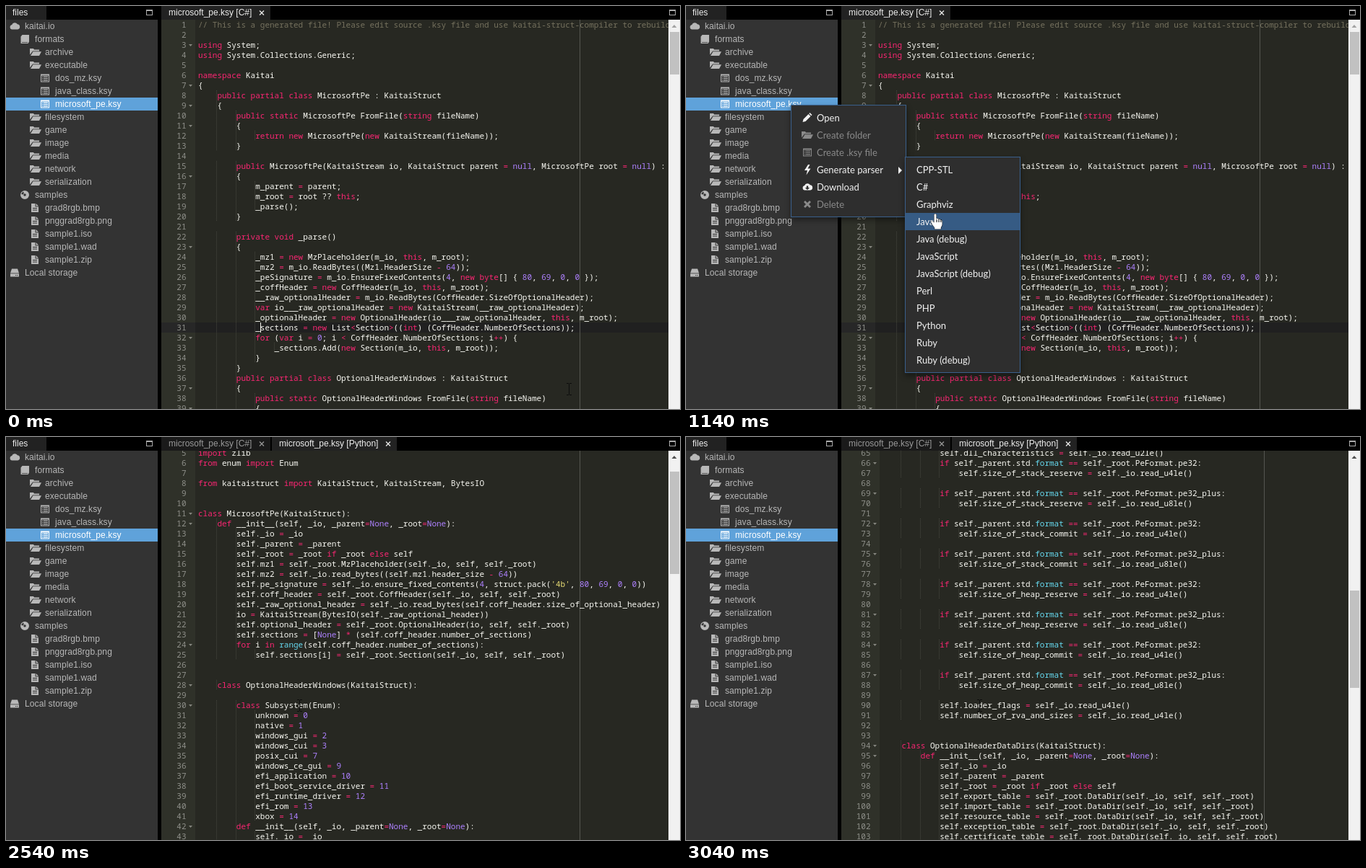
An HTML page with a canvas that plays this animation: 933x559 px, repeating every 4.16 s.

```html
<!DOCTYPE html>
<html lang="en">
<head>
<meta charset="utf-8">
<title>Parser generator</title>
<style>
html, body { margin: 0; width: 100%; height: 100%; overflow: hidden; background: #000; }
canvas { display: block; }
</style>
</head>
<body>
<canvas id="stage" width="933" height="559"></canvas>
<script>
const ctx = document.getElementById('stage').getContext('2d');
const LOOP = 4160, ROW = 14, CHAR = 6.6;
const MONO = '500 11px "Noto Sans Mono", "DejaVu Sans Mono", monospace';
const SANS = '12px "Liberation Sans", Arial, sans-serif';
const MENU_FONT = '13px Lato, sans-serif';

// ---- code shown in the two editors ----
const csharp = `// This is a generated file! Please edit source .ksy file and use kaitai-struct-compiler to rebuild

using System;
using System.Collections.Generic;

namespace Kaitai
{
    public partial class MicrosoftPe : KaitaiStruct
    {
        public static MicrosoftPe FromFile(string fileName)
        {
            return new MicrosoftPe(new KaitaiStream(fileName));
        }

        public MicrosoftPe(KaitaiStream io, KaitaiStruct parent = null, MicrosoftPe root = null) : base(io)
        {
            m_parent = parent;
            m_root = root ?? this;
            _parse();
        }

        private void _parse()
        {
            _mz1 = new MzPlaceholder(m_io, this, m_root);
            _mz2 = m_io.ReadBytes((Mz1.HeaderSize - 64));
            _peSignature = m_io.EnsureFixedContents(4, new byte[] { 80, 69, 0, 0 });
            _coffHeader = new CoffHeader(m_io, this, m_root);
            __raw_optionalHeader = m_io.ReadBytes(CoffHeader.SizeOfOptionalHeader);
            var io___raw_optionalHeader = new KaitaiStream(__raw_optionalHeader);
            _optionalHeader = new OptionalHeader(io___raw_optionalHeader, this, m_root);
            _sections = new List<Section>((int) (CoffHeader.NumberOfSections));
            for (var i = 0; i < CoffHeader.NumberOfSections; i++) {
                _sections.Add(new Section(m_io, this, m_root));
            }
        }
        public partial class OptionalHeaderWindows : KaitaiStruct
        {
            public static OptionalHeaderWindows FromFile(string fileName)
            {`;

const pad = ' '.repeat(12);
const read = (bytes, names) =>
  names.split(' ').map(n => `${pad}self.${n} = self._io.read_u${bytes}le()`).join('\n');
const bySize = name => [['pe32', 4], ['pe32_plus', 8]].map(([fmt, bytes]) =>
  `${pad}if self._parent.std.format == self._root.PeFormat.${fmt}:\n    ${read(bytes, name)}\n`).join('\n');
const dirs = names =>
  names.split(' ').map(n => `${pad}self.${n}_table = self._root.DataDir(self._io, self, self._root)`).join('\n');
const init = `def __init__(self, _io, _parent=None, _root=None):`;
const initBody = indent =>
  ['_io = _io', '_parent = _parent', '_root = _root if _root else self']
    .map(s => `${indent}self.${s}`).join('\n');

const python = `# This is a generated file! Please edit source .ksy file and use kaitai-struct-compiler to rebuild

import array
import struct
import zlib
from enum import Enum

from kaitaistruct import KaitaiStruct, KaitaiStream, BytesIO


class MicrosoftPe(KaitaiStruct):
    ${init}
${initBody('        ')}
        self.mz1 = self._root.MzPlaceholder(self._io, self, self._root)
        self.mz2 = self._io.read_bytes((self.mz1.header_size - 64))
        self.pe_signature = self._io.ensure_fixed_contents(4, struct.pack('4b', 80, 69, 0, 0))
        self.coff_header = self._root.CoffHeader(self._io, self, self._root)
        self._raw_optional_header = self._io.read_bytes(self.coff_header.size_of_optional_header)
        io = KaitaiStream(BytesIO(self._raw_optional_header))
        self.optional_header = self._root.OptionalHeader(io, self, self._root)
        self.sections = [None] * (self.coff_header.number_of_sections)
        for i in range(self.coff_header.number_of_sections):
            self.sections[i] = self._root.Section(self._io, self, self._root)


    class OptionalHeaderWindows(KaitaiStruct):

        class Subsystem(Enum):
            unknown = 0
            native = 1
            windows_gui = 2
            windows_cui = 3
            posix_cui = 7
            windows_ce_gui = 9
            efi_application = 10
            efi_boot_service_driver = 11
            efi_runtime_driver = 12
            efi_rom = 13
            xbox = 14
        ${init}
${initBody(pad)}
${bySize('image_base')}
${read(4, 'section_alignment file_alignment')}
${read(2, 'major_operating_system_version minor_operating_system_version major_image_version minor_image_version major_subsystem_version minor_subsystem_version')}
${read(4, 'win32_version_value size_of_image size_of_headers check_sum')}
${pad}self.subsystem = self._root.Subsystem(self._io.read_u2le())
${read(2, 'dll_characteristics')}
${['stack_reserve', 'stack_commit', 'heap_reserve', 'heap_commit'].map(n => bySize('size_of_' + n)).join('\n')}
${read(4, 'loader_flags number_of_rva_and_sizes')}


    class OptionalHeaderDataDirs(KaitaiStruct):
        ${init}
${initBody(pad)}
${dirs('export import resource exception certificate base_relocation')}`;

// ---- syntax colouring ----
const words = s => new Set(s.split(' '));
const KEYWORDS = words('using namespace public partial class static string return new private void var for int this byte import from def if else in');
const CONSTANTS = words('null None');
const BUILTINS = words('range format');

function colourOf(s) {
  if (/^(\/\/|#)/.test(s)) return '#75715e';
  if (s[0] === "'") return '#e6db74';
  if (/^\d+$/.test(s) || CONSTANTS.has(s)) return '#ae81ff';
  if (KEYWORDS.has(s) || /^[-+*=<>]/.test(s)) return '#f92672';
  return BUILTINS.has(s) ? '#66d9ef' : '#f8f8f2';
}

const parse = (source, foldable) => source.split('\n').map(line => ({
  indent: line.search(/\S/),
  fold: foldable(line),
  tokens: [...line.matchAll(/\/\/.*|#.*|'[^']*'|\w+|[-+*=<>]+|[^\s\w]/g)]
    .map(m => ({ text: m[0], col: m.index, colour: colourOf(m[0]) }))
}));

const editors = {
  csharp: { lines: parse(csharp, l => /\{$/.test(l) || l === 'using System;'), caret: [31, 13], thumb: 59 },
  python: { lines: parse(python, l => /:$/.test(l)), caret: [1, 0], thumb: 142 }
};

// ---- drawing helpers ----
function box(x, y, w, h, colour) {
  ctx.fillStyle = colour;
  ctx.fillRect(x, y, w, h);
}

function label(s, x, y, font, colour) {
  ctx.font = font;
  ctx.fillStyle = colour;
  ctx.fillText(s, x, y);
}

function shape(path, x, y, fill, stroke) {
  ctx.save();
  ctx.translate(x, y);
  if (stroke) { ctx.strokeStyle = stroke; ctx.lineWidth = 1; ctx.stroke(path); }
  if (fill) { ctx.fillStyle = fill; ctx.fill(path, 'evenodd'); }
  ctx.restore();
}

const CLOUD = 'M-3.5 4.5a3.3 3.3 0 0 1-.3-6.5a4.2 4.2 0 0 1 7.6-.8a3.7 3.7 0 0 1 .4 7.3z';
const icons = {
  cloud: CLOUD,
  book: 'M-3.5-6h9.5v9.5l-1.5 2.5h-10v-9.5zM-4 4.2v.9h8v-.9z',
  folder: 'M-8-5h5l1 1.5h7v2h-9l-4 5zM-3.5-.8h11.5l-3 5.8h-12z',
  ksy: 'M-6-5.5h12v11h-12zM-5-3.5v8h10v-8zM-4-2.5h1.3v1.2h-1.3zM-2-2.5h6v1.2h-6zM-4-.1h1.3v1.2h-1.3zM-2-.1h6v1.2h-6zM-4 2.3h1.3v1.2h-1.3zM-2 2.3h6v1.2h-6z',
  disc: 'M-6 0a6 6 0 0 1 12 0a6 6 0 0 1-12 0zM-1.7 0a1.7 1.7 0 0 0 3.4 0a1.7 1.7 0 0 0-3.4 0zM-4.8-1l2.4.5a2 2 0 0 1 1.3-1.7l-1-2.2a5 5 0 0 0-2.7 3.4z',
  file: 'M-5-6h5.5v4.5h4.5v7.5h-10zM1.5-6l3.5 3.5h-3.5zM-3 0v1h6v-1zM-3 2.5v1h6v-1z',
  disk: 'M-4-5.5h8l2 6h-12zM-6 1.3h12v4.2h-12zM1 3v1h1.2v-1zM3.2 3v1h1.2v-1z',
  pencil: 'M-6.5 6l1-4 7-7 3 3-7 7zM2.3-5.8l1.2-1.2 3 3-1.2 1.2z',
  bolt: 'M1-7l-5 8h4l-1.5 6.5 6-9h-4l3-5.5z',
  download: CLOUD + 'M-1.2-1.5h2.4v2.6h2l-3.2 3-3.2-3h2z',
  cross: 'M-5-3l2-2 3 3 3-3 2 2-3 3 3 3-2 2-3-3-3 3-2-2 3-3z'
};
for (const name in icons) icons[name] = new Path2D(icons[name]);

const arrowShape = new Path2D('M.5.5v16l3.8-3.6 2.5 5.8 2.4-1-2.5-5.7h5.2z');
const handShape = new Path2D('M-1.5 1.2q1.5-2 3 0v6q2.6-1 3 .8q2.4-.8 2.9.9q2.2-.3 2.2 2v4.2q0 2-1.8 4v2.5h-8.6v-2.2q-3-3.4-5-7.4q-.4-2.3 2-1.8l2.3 2.4z');

// ---- sidebar ----
const tree = [
  [0, 'cloud', 'kaitai.io'], [1, 'book', 'formats'],
  [2, 'folder', 'archive'], [2, 'folder', 'executable'],
  [3, 'ksy', 'dos_mz.ksy'], [3, 'ksy', 'java_class.ksy'], [3, 'ksy', 'microsoft_pe.ksy'],
  ...'filesystem game image media network serialization'.split(' ').map(n => [2, 'folder', n]),
  [1, 'disc', 'samples'],
  ...'grad8rgb.bmp pnggrad8rgb.png sample1.iso sample1.wad sample1.zip'.split(' ').map(n => [2, 'file', n]),
  [0, 'disk', 'Local storage']
];

function drawSidebar() {
  box(0, 19, 210, 540, '#333');
  tree.forEach(([depth, icon, name], i) => {
    const y = 28 + 18 * i, chosen = i === 6;
    if (chosen) box(0, 127, 210, 18, '#5fa2da');
    const colour = chosen ? '#fff' : '#b8b8b8';
    shape(icons[icon], 12 + 14 * depth + (icon === 'folder' ? 1 : 0), y, colour);
    ctx.letterSpacing = '0.1px';
    label(name, 26 + 14 * depth, y + 4, SANS, colour);
    ctx.letterSpacing = '0px';
  });
}

// ---- tabs ----
function maximise(x) {
  ctx.strokeStyle = '#aaa';
  ctx.lineWidth = 1;
  ctx.strokeRect(x + .5, 5.5, 8, 7);
  box(x, 5, 9, 2, '#aaa');
}

function tab(x, w, title, active, closable) {
  box(x, 0, w, 19, active ? '#222' : '#1a1a1a');
  const colour = active ? '#eee' : '#999';
  label(title, x + (closable ? 10 : 9), 13, SANS, colour);
  if (!closable) return;
  const cx = x + w - 12;
  ctx.strokeStyle = colour;
  ctx.lineWidth = 1.2;
  ctx.beginPath();
  ctx.moveTo(cx - 3, 6.5); ctx.lineTo(cx + 3, 12.5);
  ctx.moveTo(cx + 3, 6.5); ctx.lineTo(cx - 3, 12.5);
  ctx.stroke();
}

function drawTabs(t) {
  box(0, 0, 933, 19, '#000');
  box(210, 0, 5, 559, '#000');
  tab(0, 56, 'files', true, false);
  tab(215, 151, 'microsoft_pe.ksy [C#]', t < 2000, true);
  if (t >= 2000) tab(368, 173, 'microsoft_pe.ksy [Python]', true, true);
  maximise(194);
  maximise(918);
}

// ---- editor ----
const WHEEL = [2540, 2590, 2590, 2630, 2670, 2720, 2760, 2800, 2850, 2900, 2900, 2940, 2990, 2990, 3040];
const scrollAt = t => 60 * WHEEL.filter(s => t >= s).length;

function triangle(x1, y1, x2, y2, x3, y3, colour) {
  ctx.fillStyle = colour;
  ctx.beginPath();
  ctx.moveTo(x1, y1); ctx.lineTo(x2, y2); ctx.lineTo(x3, y3);
  ctx.fill();
}

function drawEditor({ lines, caret, thumb }, scroll) {
  const wide = scroll + 540 > 99 * ROW;
  const shift = wide ? 6 : 0, left = 266 + shift;
  const [caretLine, caretCol] = caret;
  const top = n => 19 + (n - 1) * ROW - scroll;
  ctx.save();
  ctx.beginPath();
  ctx.rect(215, 19, 702, 540);
  ctx.clip();
  box(215, 19, 702, 540, '#272822');
  box(215, 19, 47 + shift, 540, '#2f3129');
  box(262 + shift, top(caretLine), 700, ROW, '#202020');
  box(215, top(caretLine), 47 + shift, ROW, '#272727');
  box(left + 528, 19, 1, 540, '#555651');
  lines.forEach((line, i) => {
    const y = top(i + 1);
    if (y < 5 || y > 559) return;
    ctx.textAlign = 'right';
    label(i + 1, 249.5 + shift, y + 11, MONO, '#8f908a');
    ctx.textAlign = 'left';
    if (line.fold) triangle(253 + shift, y + 6, 258 + shift, y + 6, 255.5 + shift, y + 9, '#85867f');
    for (let c = 4; c <= line.indent; c += 4)
      for (let d = 0; d < ROW; d += 2) box(Math.round(left + c * CHAR) - 1, y + d, 1, 1, '#46473f');
    for (const k of line.tokens) label(k.text, left + k.col * CHAR, y + 11, MONO, k.colour);
  });
  box(Math.round(left + caretCol * CHAR), top(caretLine), 1, ROW, '#f8f8f0');
  ctx.restore();

  box(917, 19, 16, 540, '#f1f1f1');
  triangle(921.5, 30, 928.5, 30, 925, 26, scroll ? '#505050' : '#a3a3a3');
  box(919, wide ? 213 : Math.round(36 + scroll * .2), 13, wide ? 135 : thumb, '#c1c1c1');
}

// ---- context menu ----
const mainMenu = {
  x: 145, y: 137, textX: 181,
  items: ['Open', 'Create folder', 'Create .ksy file', 'Generate parser', 'Download', 'Delete'],
  icons: ['pencil', 'folder', 'ksy', 'bolt', 'download', 'cross'],
  off: [1, 2, 5]
};
const subMenu = {
  x: 303, y: 209, textX: 319, off: [],
  items: ['CPP-STL', 'C#', 'Graphviz', 'Java', 'Java (debug)', 'JavaScript', 'JavaScript (debug)',
    'Perl', 'PHP', 'Python', 'Ruby', 'Ruby (debug)']
};

function hit(menu, p) {
  if (p.x < menu.x || p.x > menu.x + 160) return -1;
  const i = Math.floor((p.y - menu.y - 6) / 24);
  return i < menu.items.length ? i : -1;
}

function drawMenu(menu, hover) {
  const h = menu.items.length * 24 + 12;
  ctx.save();
  ctx.shadowColor = 'rgba(0,0,0,.4)';
  ctx.shadowBlur = 8;
  ctx.shadowOffsetY = 4;
  box(menu.x, menu.y, 160, h, '#2e2e2e');
  ctx.restore();
  ctx.strokeStyle = '#3a608c';
  ctx.lineWidth = 1;
  ctx.strokeRect(menu.x + .5, menu.y + .5, 159, h - 1);
  menu.items.forEach((item, i) => {
    const y = menu.y + 18 + 24 * i, off = menu.off.includes(i);
    const colour = off ? '#8a8a8a' : '#f2f2f2';
    if (i === hover && !off) box(menu.x + 1, y - 12, 158, 24, '#365b84');
    if (menu.icons) shape(icons[menu.icons[i]], 168, y, colour);
    label(item, menu.textX, y + 5, MENU_FONT, colour);
    if (item === 'Generate parser') triangle(294, y - 4, 294, y + 6, 299, y + 1, colour);
  });
}

// ---- mouse pointer ----
const path = [
  [44, 779, 531], [320, 330, 240], [460, 147, 138], [654, 147, 138], [830, 221, 205],
  [960, 262, 227], [1050, 330, 235], [1210, 375, 395], [1440, 375, 441],
  [2000, 375, 440], [2390, 406, 372]
];

function pointerAt(t) {
  const next = path.findIndex(p => p[0] > t);
  if (next < 1) {
    const [, x, y] = path[next ? path.length - 1 : 0];
    return { x, y };
  }
  const [t0, x0, y0] = path[next - 1], [t1, x1, y1] = path[next];
  const hops = Math.round((t1 - t0) / 46);
  const f = Math.floor((t - t0) / (t1 - t0) * hops) / hops;
  return { x: Math.round(x0 + (x1 - x0) * f), y: Math.round(y0 + (y1 - y0) * f) };
}

const pointers = {
  arrow: p => shape(arrowShape, p.x, p.y, '#fff', '#000'),
  hand: p => {
    shape(handShape, p.x, p.y, '#fff', '#000');
    for (const dx of [1.5, 4.5, 7.4]) box(p.x + dx, p.y + 8, 1, 4, '#000');
  },
  beam: ({ x, y }) => {
    box(x, y - 7, 1, 15, '#0c0c0c');
    for (const dy of [-8, 8]) {
      box(x - 3, y + dy, 3, 1, '#0c0c0c');
      box(x + 1, y + dy, 3, 1, '#0c0c0c');
    }
  },
  blocked: ({ x, y }) => {
    ctx.beginPath();
    ctx.arc(x, y, 8, 0, 7);
    ctx.fillStyle = '#fff';
    ctx.fill();
    ctx.strokeStyle = '#d8141c';
    ctx.lineWidth = 2.6;
    ctx.beginPath();
    ctx.arc(x, y, 5.8, 0, 7);
    ctx.moveTo(x - 4, y - 4);
    ctx.lineTo(x + 4, y + 4);
    ctx.stroke();
  }
};

function draw(t) {
  drawSidebar();
  drawEditor(t < 2000 ? editors.csharp : editors.python, scrollAt(t));
  drawTabs(t);

  const p = pointerAt(t);
  const open = t >= 600 && t < 1720, subOpen = open && t >= 960;
  let kind = p.x < 215 ? 'arrow' : 'beam';
  if (open) {
    const sub = subOpen ? hit(subMenu, p) : -1;
    const main = sub < 0 ? hit(mainMenu, p) : -1;
    ctx.globalAlpha = t < 1640 ? 1 : .5;
    drawMenu(mainMenu, main);
    if (subOpen) drawMenu(subMenu, sub);
    ctx.globalAlpha = 1;
    if (mainMenu.off.includes(main)) kind = 'blocked';
    else if (sub >= 0 || main >= 0) kind = 'hand';
  }
  pointers[kind](p);
}

const start = performance.now();
function tick() {
  draw((performance.now() - start) % LOOP);
  requestAnimationFrame(tick);
}
tick();
</script>
</body>
</html>
```
